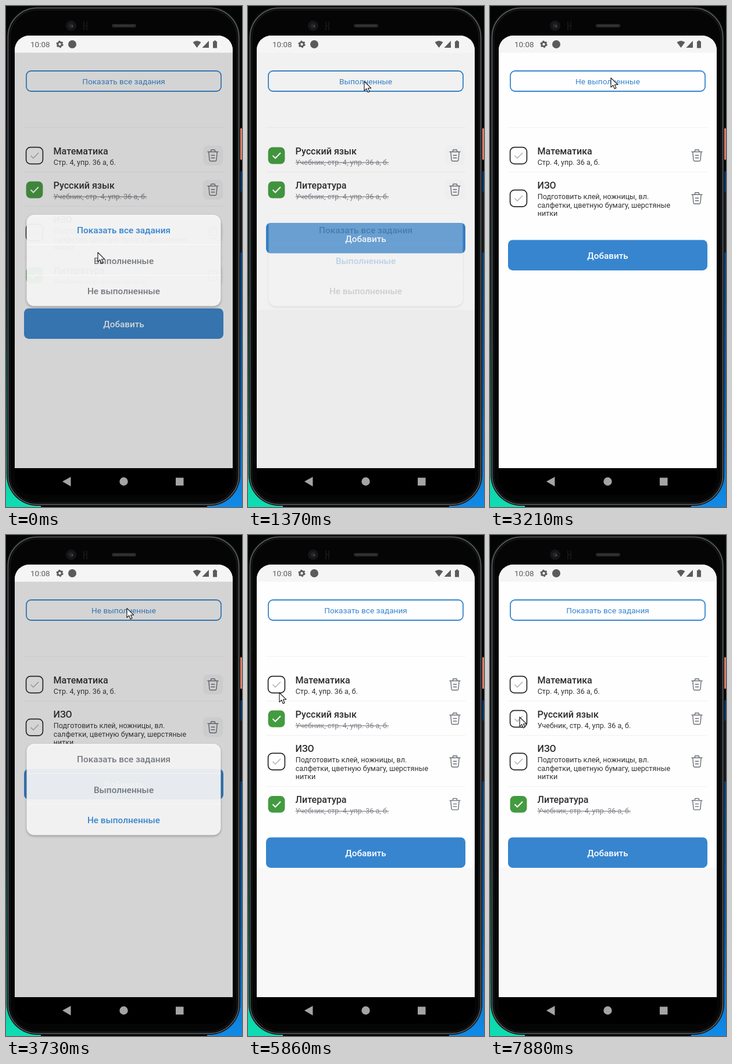
Write an HTML page that moves like this. It is 406 px wide and 864 px high and loops after 8 s.

```html
<!DOCTYPE html>
<html lang="ru">
<head>
<meta charset="utf-8">
<title>Список заданий</title>
<style>
  html, body { margin: 0; width: 100%; height: 100%; overflow: hidden; background: #000; }
  svg { display: block; width: 406px; height: 864px; font-family: Roboto, sans-serif; }
  .title { font-size: 16.1px; font-weight: 500; fill: #2d2d2d; }
  .note { font-size: 12.58px; fill: #333; }
  .done .note { fill: #80848a; text-decoration: line-through; }
  .box { fill: #fefefe; stroke: #262626; stroke-width: 1.7; }
  .done .box { fill: #439b3f; stroke-width: 0; }
  .tick { fill: none; stroke: #b0b0b0; stroke-width: 1.5; }
  .done .tick { stroke: #fff; stroke-width: 2.1; }
  .bin { fill: none; stroke: #686d76; stroke-width: 1.4; stroke-linecap: round; stroke-linejoin: round; }
  .mid { text-anchor: middle; }
  .option { font-size: 15.3px; font-weight: 500; fill: #74787e; }
  .option.on { fill: #3785cf; }
  #card { filter: drop-shadow(0 2px 2px rgba(0, 0, 0, .3)); }
</style>
</head>
<body>
<svg viewBox="0 0 406 864">
  <defs>
    <linearGradient id="leftGlow" x2="0" y2="1">
      <stop offset="0" stop-color="#03120e"/><stop offset=".45" stop-color="#05382c"/>
      <stop offset=".9" stop-color="#0ad3a4"/><stop offset="1" stop-color="#10dcb4"/>
    </linearGradient>
    <linearGradient id="rightGlow" x2="0" y2="1">
      <stop offset="0" stop-color="#08305c"/><stop offset=".7" stop-color="#0b5da8"/>
      <stop offset="1" stop-color="#108be8"/>
    </linearGradient>
    <clipPath id="screen"><path d="M15 76a25 25 0 0 1 25-25H365a25 25 0 0 1 25 25V797H15z"/></clipPath>
  </defs>

  <!-- desktop and phone body -->
  <rect width="406" height="864" fill="#020504"/>
  <rect y="200" width="60" height="664" fill="url(#leftGlow)"/>
  <rect x="346" y="285" width="60" height="579" fill="url(#rightGlow)"/>
  <rect x="1" y="1" width="402" height="861" rx="53" fill="#141517"/>
  <rect x="3.5" y="3.5" width="397" height="856" rx="50.500" fill="#060607" stroke="#5f6265" stroke-width="1.600"/>
  <rect x="6.500" y="6.500" width="391" height="850" rx="47.500" fill="#050506" stroke="#151617" stroke-width="2"/>
  <rect x="403" y="211" width="3" height="54" fill="#d67d6b"/>
  <rect x="403" y="320" width="3" height="105" fill="#17191c"/>
  <circle cx="112" cy="34" r="9" fill="#151617"/>
  <circle cx="112" cy="34" r="4" fill="#24262a"/>
  <circle cx="114" cy="35" r="1.3" fill="#51555c"/>
  <path d="M134 27v15M139 27v15M134 34h5" stroke="#151515" stroke-width="2"/>
  <rect x="182" y="31" width="42" height="6" rx="3" fill="#252627"/>
  <rect x="185" y="33" width="36" height="2" rx="1" fill="#353637"/>

  <g clip-path="url(#screen)">
    <rect x="15" y="51" width="375" height="746" fill="#fefefe"/>
    <rect x="15" y="51" width="375" height="29.5" fill="#f5f5f5"/>
    <rect id="tint" x="15" width="375" height="300"/>

    <rect x="35" y="112" width="335" height="35" rx="8" fill="none" stroke="#3785cf" stroke-width="1.8"/>
    <text id="filter" class="mid" x="202.5" y="135" font-size="13.65" fill="#3785cf"></text>
    <path d="M31 209.5H374" stroke="#f2f2f2"/>
    <g id="list"></g>
    <g id="add">
      <rect x="31" width="343" height="52.5" rx="8" fill="#3785cf"/>
      <text class="mid" x="202.5" y="32.5" font-size="15.3" font-weight="500" fill="#fff">Добавить</text>
    </g>
    <rect id="dim" x="15" y="80.5" width="375" height="717" fill="#2d2d2d"/>
    <g id="card">
      <rect x="35.500" y="360" width="334" height="157.5" rx="13" fill="#f8f8f8" fill-opacity=".94"/>
      <path d="M36 411.5H369.5M36 464.5H369.5" stroke="#fff" stroke-opacity=".6"/>
      <g id="options"></g>
    </g>
  </g>

  <!-- status bar -->
  <g fill="#5b5b5b">
    <text x="42" y="71" font-size="13.5">10:08</text>
    <circle cx="92.5" cy="66" r="3.6" fill="none" stroke="#5b5b5b" stroke-width="2.8"/>
    <circle cx="92.5" cy="66" r="5.3" fill="none" stroke="#5b5b5b" stroke-width="1.8" stroke-dasharray="2.8 2.75"/>
    <circle cx="114" cy="66" r="7"/>
    <path d="M321.5 62.5Q328.5 57.5 335.5 62.5L328.5 72z"/>
    <path d="M337.5 72L349 60V72z"/>
    <path d="M356 61h2v-1.5h3V61h2V72.5H356z"/>
  </g>

  <!-- navigation bar -->
  <path d="M15 797H390V813a30 30 0 0 1-30 30H45a30 30 0 0 1-30-30z" fill="#000"/>
  <g fill="#a4a4a4">
    <path d="M97 820L111.5 812V828.5z"/>
    <circle cx="202.5" cy="820" r="7.2"/>
    <rect x="292" y="813.5" width="13.5" height="13.5"/>
  </g>

  <path id="cursor" d="M0 0V16.2L3.7 12.7L6.3 18.7L9 17.5L6.5 11.7H11.7z" fill="#fff" stroke="#111" stroke-width="1.1" stroke-linejoin="round"/>
</svg>
<script>
const LOOP = 8000, FADE_IN = 230, FADE_OUT = 180;
const $ = id => document.getElementById(id);
const set = (node, name, value) => node.setAttribute(name, value);

const filters = ['Показать все задания', 'Выполненные', 'Не выполненные'];
const homework = ['Учебник, стр. 4, упр. 36 а, б.'];
const tasks = [
  { title: 'Математика', note: ['Стр. 4, упр. 36 а, б.'], done: t => t >= 6300 && t < 6770 },
  { title: 'Русский язык', note: homework, done: t => t < 7600 },
  { title: 'ИЗО', note: ['Подготовить клей, ножницы, вл.', 'салфетки, цветную бумагу, шерстяные', 'нитки'], done: () => false },
  { title: 'Литература', note: homework, done: () => true }
];

// When each dialog opens and is answered, and the filter marked in it
const dialogs = [
  { open: -1000, close: 350, mark: 0 },
  { open: 1290, close: 2390, mark: 1 },
  { open: 3520, close: 4640, mark: 2 }
];

// Pointer stops: time, x, y
const path = [
  [20, 158, 425], [140, 172, 440], [480, 172, 440], [890, 200, 130],
  [1440, 200, 130], [1820, 191, 495], [2690, 191, 495], [3110, 207, 117],
  [3210, 208, 124], [3700, 208, 124], [4270, 202, 389], [4780, 202, 389],
  [5080, 305, 362], [5400, 361, 245], [5450, 361, 245], [5550, 345, 214],
  [5820, 57, 277], [5860, 54, 272], [6150, 57, 265], [6930, 57, 265],
  [7200, 52, 385], [7420, 50, 317], [7600, 50, 317], [7880, 51, 314]
];

const rowMarkup = ({ title, note, height }) => {
  const c = height / 2 + 0.5;
  const lines = note.map((s, i) => `<text class="note" x="81.7" y="${46 + i * 14.7}">${s}</text>`).join('');
  return `<rect class="box" x="34.6" y="${c - 14.4}" width="28.8" height="28.8" rx="7.5"/>
    <path class="tick" d="M42.5 ${c}l4.5 4.5l9-9.2"/>
    <text class="title" x="81.5" y="28">${title}</text>${lines}
    <rect class="pad" x="339" y="${c - 17.5}" width="34.5" height="34.5" rx="8"/>
    <path class="bin" transform="translate(356 ${c})" d="M-9-6.5H9M-4-6.5L-3-10H3L4-6.5M-7.2-6.5L-6 7.5Q-5.7 9.5-4 9.5H4Q5.7 9.5 6 7.5L7.2-6.5M-2.8-.5H2.8M-2.8 4H2.8"/>
    <path class="line" d="M31 ${height - .5}H374" stroke="#f0f0f0"/>`;
};

for (const task of tasks) {
  task.height = 59 + (task.note.length - 1) * 14.7;
  task.node = document.createElementNS('http://www.w3.org/2000/svg', 'g');
  task.node.innerHTML = rowMarkup(task);
  $('list').append(task.node);
}
$('options').innerHTML = filters.map((s, i) =>
  `<text class="option mid" x="202.5" y="${392 + i * 52.7}">${s}</text>`).join('');
const options = [...$('options').children];
const pads = document.querySelectorAll('.pad');

const clamp = v => Math.min(1, Math.max(0, v));
const smooth = v => v * v * (3 - 2 * v);

function pointer(t) {
  const i = path.findIndex(p => p[0] > t);
  if (i === 0) return path[0].slice(1);
  if (i < 0) return path[path.length - 1].slice(1);
  const [t0, x0, y0] = path[i - 1], [t1, x1, y1] = path[i];
  const k = smooth((t - t0) / (t1 - t0));
  return [x0 + (x1 - x0) * k, y0 + (y1 - y0) * k];
}

function draw(t) {
  const filter = t < 350 ? 0 : t < 2380 ? 1 : t < 4610 ? 2 : 0;
  const dialog = dialogs.filter(d => t >= d.open).pop();
  const shade = smooth(clamp((t - dialog.open) / FADE_IN)) * (1 - smooth(clamp((t - dialog.close) / FADE_OUT)));

  $('filter').textContent = filters[filter];
  const shown = tasks.filter(task => !filter || task.done(t) === (filter === 1));
  let y = 228;
  for (const task of tasks) {
    const visible = shown.includes(task);
    task.node.style.display = visible ? '' : 'none';
    if (!visible) continue;
    set(task.node, 'transform', `translate(0 ${y})`);
    set(task.node, 'class', task.done(t) ? 'done' : '');
    task.node.querySelector('.line').style.display = task === shown[shown.length - 1] ? 'none' : '';
    y += task.height;
  }
  set($('add'), 'transform', `translate(0 ${y + 28})`);

  set($('tint'), 'y', filter === 1 ? 524 : 574);
  set($('tint'), 'fill-opacity', filter === 2 ? 0 : (filter ? .027 : .022) * (1 - shade));
  set($('dim'), 'fill-opacity', .2 * shade);
  pads.forEach(pad => set(pad, 'fill-opacity', .04 * shade));
  $('card').style.opacity = shade;
  options.forEach((o, i) => o.classList.toggle('on', i === dialog.mark));
  set($('cursor'), 'transform', `translate(${pointer(t)})`);
}

const start = performance.now();
function tick() {
  draw((performance.now() - start) % LOOP);
  requestAnimationFrame(tick);
}
tick();
</script>
</body>
</html>
```
